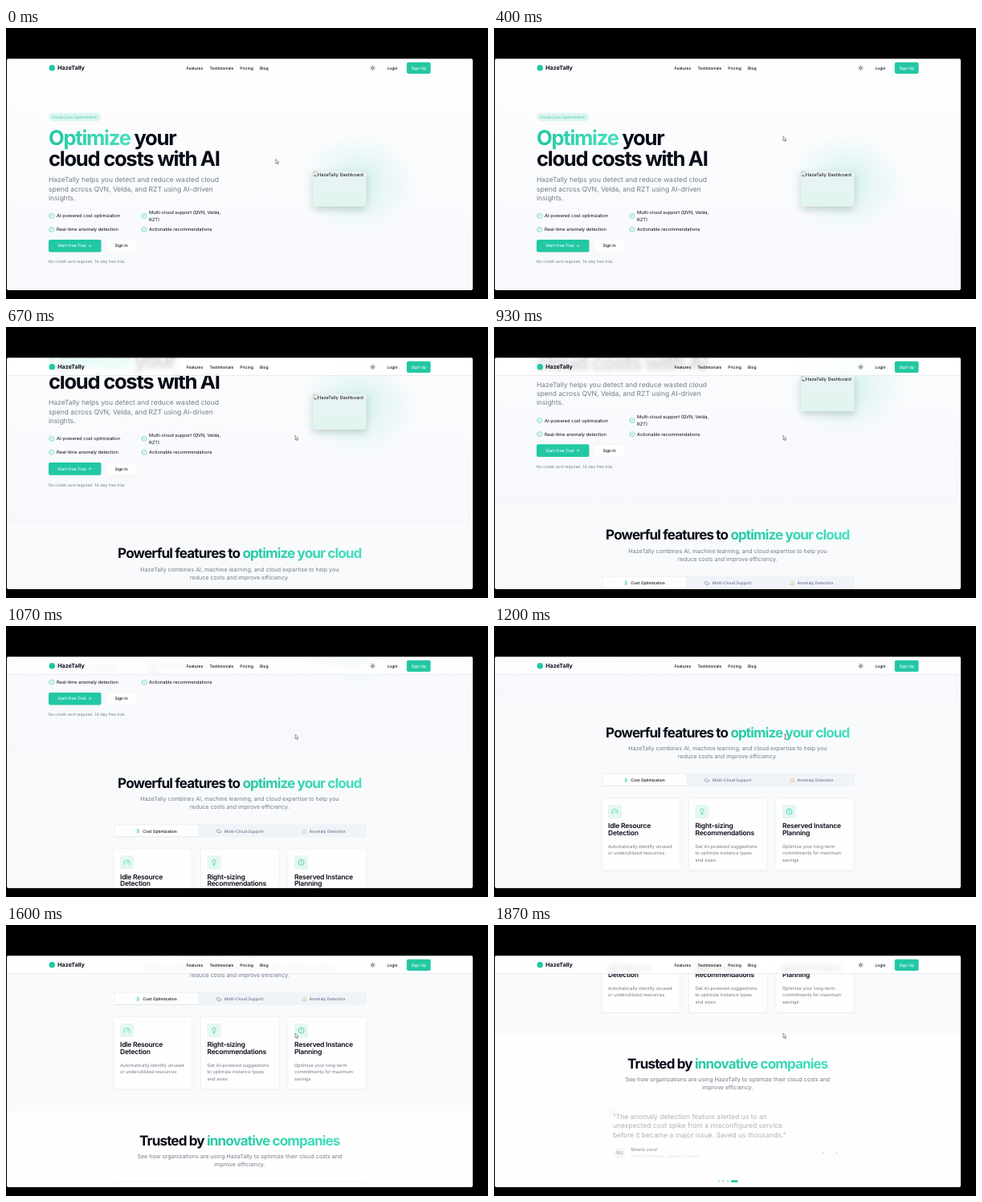
Recreate the animation shown at these times as an HTML page. Size 600x338 px, loop 1.94 s.

```html
<!DOCTYPE html>
<html lang="en">
<head>
<meta charset="utf-8">
<title>Landing page scroll</title>
<style>
html, body { margin: 0; width: 100%; height: 100%; overflow: hidden; background: #000; }
#win { position: absolute; left: 1px; top: 38px; width: 580px; height: 289px; overflow: hidden; border-radius: 3px; background: #fefefe; }
svg { position: absolute; left: -1px; top: -38px; overflow: visible; }
#bar { position: absolute; inset: 0 0 auto; height: 23.3px; box-sizing: border-box; background: #ffffffd4; backdrop-filter: blur(3px); border-bottom: .4px solid #e8ebf0; }
#edge { position: absolute; inset: 0; border-radius: 3px; box-shadow: inset 0 1px #70707499, inset .5px 0 #88888c66; }
text { font-family: Inter, "Open Sans", sans-serif; font-optical-sizing: none; text-rendering: geometricPrecision; white-space: pre; }
</style>
</head>
<body>
<div id="win">
  <svg id="page" width="600" height="800"></svg>
  <div id="bar"></div>
  <svg id="top" width="600" height="338"></svg>
  <div id="edge"></div>
</div>
<script>
const $ = id => document.getElementById(id);
const TEAL = '#22c8a3', INK = '#080b18', GRAY = '#747b88';
const SM = 4.98, BASE = 5.69, LG = 7.11, XL = 8.53;

const text = (x, y, str, size = SM, fill = INK, weight = 400, extra = '') =>
  `<text x="${x}" y="${y}" font-size="${size}" fill="${fill}" font-weight="${weight}" ${extra}>${str}</text>`;
const lines = (x, y, gap, rows, ...style) =>
  rows.map((row, i) => text(x, y + i * gap, row, ...style)).join('');
const rect = (x, y, w, h, fill, r = 2, extra = '') =>
  `<rect x="${x}" y="${y}" width="${w}" height="${h}" rx="${r}" fill="${fill}" ${extra}/>`;
const dot = (x, y, r, fill, extra = '') => `<circle cx="${x}" cy="${y}" r="${r}" fill="${fill}" ${extra}/>`;
// 24-unit line icon centred on x, y
const icon = (x, y, size, color, path, width = 2) =>
  `<path transform="translate(${x} ${y}) scale(${size / 24}) translate(-12 -12)" d="${path}" fill="none" stroke="${color}" stroke-width="${width}" stroke-linecap="round" stroke-linejoin="round"/>`;
const gradient = (id, x1, x2) =>
  `<linearGradient id="${id}" gradientUnits="userSpaceOnUse" x1="${x1}" x2="${x2}"><stop stop-color="#25c7a2"/><stop offset="1" stop-color="#45e2c0"/></linearGradient>`;

const MID = 290.8, center = 'text-anchor="middle"', tight = 'letter-spacing="-.05em"';
const RING = 'M2 12a10 10 0 1 0 20 0a10 10 0 1 0-20 0';
const CHECK = RING + 'M9 12l2 2 4-4';
const CLOCK = RING + 'M12 6v6l4 2';
const GAUGE = 'M12 14l4-4M3.34 19a10 10 0 1 1 17.32 0';
const BULB = 'M15 14c.2-1 .7-1.7 1.5-2.5 1-.9 1.5-2.2 1.5-3.5A6 6 0 0 0 6 8c0 1 .2 2.2 1.5 3.5.7.7 1.3 1.5 1.5 2.5M9 18h6M10 22h4';
const DOLLAR = 'M12 2v20M17 5H9.5a3.5 3.5 0 0 0 0 7h5a3.5 3.5 0 0 1 0 7H6';
const CLOUD = 'M17.5 19H9a7 7 0 1 1 6.71-9h1.79a4.5 4.5 0 1 1 0 9Z';
const ALERT = 'M21.73 18l-8-14a2 2 0 0 0-3.48 0l-8 14A2 2 0 0 0 4 21h16a2 2 0 0 0 1.73-3M12 9v4M12 17h.01';
const ARROW = 'M5 12h14M12 5l7 7-7 7';
const SUN = 'M8 12a4 4 0 1 0 8 0a4 4 0 1 0-8 0M12 2v2M12 20v2M2 12h2M20 12h2M5 5l1.3 1.3M17.7 17.7L19 19M5 19l1.3-1.3M17.7 6.3L19 5';
const QUOTE = 'M3 20c4 0 6-2 6-7V5H2v8h4c0 3-1 4-3 4zM16 20c4 0 6-2 6-7V5h-7v8h4c0 3-1 4-3 4z';

const defs = `<defs>
  ${gradient('g1', 53, 158)}${gradient('g2', 295, 449)}${gradient('g3', 249, 421)}
  <linearGradient id="sky" x2="0" y2="1"><stop stop-color="#fefeff"/><stop offset="1" stop-color="#f6f8fb"/></linearGradient>
  <linearGradient id="shot" x2="0" y2="1"><stop stop-color="#e9f2f4"/><stop offset="1" stop-color="#e1f6ef"/></linearGradient>
  <radialGradient id="glow"><stop stop-color="#22c8a3" stop-opacity=".2"/><stop offset=".5" stop-color="#22c8a3" stop-opacity=".08"/><stop offset="1" stop-color="#22c8a3" stop-opacity="0"/></radialGradient>
  <filter id="soft" x="-40%" y="-40%" width="180%" height="200%"><feDropShadow dx="0" dy="4" stdDeviation="4" flood-color="#20443c" flood-opacity=".22"/></filter>
  <filter id="lift" x="-10%" y="-20%" width="120%" height="150%"><feDropShadow dx="0" dy=".5" stdDeviation=".6" flood-opacity=".12"/></filter>
</defs>`;

const hero = rect(0, 38, 600, 302, 'url(#sky)', 0) +
  rect(53, 106, 65.5, 10.3, '#def5ef', 5.1) +
  text(57, 112.8, 'Cloud Cost Optimization', SM, '#3ccbaa') +
  text(53, 146, '<tspan fill="url(#g1)">Optimize</tspan> your', 25.6, INK, 700, tight) +
  text(53, 171.6, 'cloud costs with AI', 25.6, INK, 700, tight) +
  lines(53, 192.2, 11.38, ['HazeTally helps you detect and reduce wasted cloud',
    'spend across QVN, Velda, and RZT using AI-driven', 'insights.'], XL, GRAY) +
  [[56.7, 234.3], [172, 234.3], [56.7, 251.3], [172, 251.3]].map(p => icon(...p, LG, TEAL, CHECK)).join('') +
  text(63, 236.3, 'AI-powered cost optimization', BASE) +
  lines(178, 232, XL, ['Multi-cloud support (QVN, Velda,', 'RZT)'], BASE) +
  text(63, 253.3, 'Real-time anomaly detection', BASE) +
  text(178, 253.3, 'Actionable recommendations', BASE) +
  rect(53, 264, 65.5, 15.6, TEAL) +
  text(64.5, 273.4, 'Start Free Trial', SM, '#fff', 500) +
  icon(104.3, 271.7, 5.7, '#fff', ARROW) +
  rect(124, 264, 39.7, 15.6, '#fefefe', 2, 'stroke="#e6e9ee" stroke-width=".4"') +
  text(135.5, 273.4, 'Sign In', SM, INK, 500) +
  text(53, 293.4, 'No credit card required. 14-day free trial.', SM, GRAY) +
  '<ellipse cx="438" cy="192" rx="72" ry="62" fill="url(#glow)"/>' +
  rect(382.3, 178.5, 66, 43.8, 'url(#shot)', 2, 'filter="url(#soft)"') +
  '<path d="M383 179.4h3.2l1.6 1.6v4h-4.8z" fill="#fff" stroke="#777" stroke-width=".5"/><path d="M383.3 184.6l1.6-2 2.2 2z" fill="#4a9b54"/>' +
  text(388, 185.1, 'HazeTally Dashboard', BASE);

const card = (x, path, title, body) =>
  rect(x, 459, 97.5, 90.3, '#fefefe', 2.5, 'filter="url(#lift)" stroke="#e6eaef" stroke-width=".4"') +
  rect(x + 8, 467.5, 17, 17, '#e4f7f2') +
  icon(x + 16.5, 476, XL, TEAL, path) +
  lines(x + 8, 496.6, XL, title, XL, INK, 600, 'letter-spacing="-.025em"') +
  lines(x + 8, 521, XL, body, BASE, GRAY);

const features = rect(0, 340, 600, 236.5, '#f8fafc', 0) +
  text(MID, 383.1, 'Powerful features to <tspan fill="url(#g2)">optimize your cloud</tspan>', 17.06, INK, 700, center + tight) +
  lines(MID, 399.5, 9.95, ['HazeTally combines AI, machine learning, and cloud expertise to help you',
    'reduce costs and improve efficiency.'], LG, GRAY, 400, center) +
  rect(134, 428.3, 315, 16.3, '#f0f3f7') +
  rect(135.3, 429.6, 103.7, 13.7, '#fefefe', 1.4, 'filter="url(#lift)"') +
  icon(164.3, 436.8, 6, TEAL, DOLLAR) + text(170.3, 438.7, 'Cost Optimization', SM, INK, 500) +
  icon(265, 436.8, 6.4, '#64748b', CLOUD) + text(272, 438.7, 'Multi-Cloud Support', SM, '#64748b', 500) +
  icon(371, 436.8, 6.4, '#d6b06f', ALERT) + text(377.5, 438.7, 'Anomaly Detection', SM, '#64748b', 500) +
  card(134, GAUGE, ['Idle Resource', 'Detection'], ['Automatically identify unused', 'or underutilized resources']) +
  card(242.5, BULB, ['Right-sizing', 'Recommendations'], ['Get AI-powered suggestions', 'to optimize instance types', 'and sizes']) +
  card(351, CLOCK, ['Reserved Instance', 'Planning'], ['Optimize your long-term', 'commitments for maximum', 'savings']);

const stories = rect(0, 576.5, 600, 300, '#fefefe', 0) +
  text(MID, 619.7, 'Trusted by <tspan fill="url(#g3)">innovative companies</tspan>', 17.06, INK, 700, center + tight) +
  lines(MID, 635.5, 9.95, ['See how organizations are using HazeTally to optimize their cloud costs and',
    'improve efficiency.'], LG, GRAY, 400, center) +
  rect(134, 664.5, 315, 82, '#fefefe', 2.5, 'id="frame" stroke="#e2e6ec" stroke-width=".5"') +
  '<g id="slide">' +
  icon(148, 673, 11, '#b4e8dc', QUOTE, 1.5) +
  lines(148, 682.5, 11.38, ['"The anomaly detection feature alerted us to an',
    'unexpected cost spike from a misconfigured service',
    'before it became a major issue. Saved us thousands."'], XL, '#3b4250') +
  dot(156.5, 724.5, 7, '#e6e9ee') + text(156.5, 726.4, 'MJ', BASE, INK, 400, center) +
  text(170.5, 722.6, 'Meera Joral', BASE, INK, 500) +
  text(170.5, 730.4, 'DevOps Manager, Lumbrel Solutions', SM, '#b4b9c2') +
  '</g>' +
  [[409.6, 'M15 18l-6-6 6-6'], [426.4, 'M9 18l6-6-6-6']].map(([x, d]) =>
    dot(x, 724.5, 5.5, '#fefefe', 'stroke="#f2f4f6" stroke-width=".4"') + icon(x, 724.5, 5, '#71767f', d)).join('') +
  [279.8, 285.5, 291.2].map(x => dot(x, 760, 1.4, '#a5e8d8')).join('') +
  rect(295, 758.6, 8.7, 2.8, TEAL, 1.4);

$('page').innerHTML = defs + hero + features + stories;

$('top').innerHTML = dot(57.3, 49.7, 3.8, TEAL) +
  text(64.3, 52.2, 'HazeTally', LG, INK, 700) +
  [[224.5, 'Features'], [253.5, 'Testimonials'], [291.2, 'Pricing'], [316, 'Blog'], [474.4, 'Login']]
    .map(([x, label]) => text(x, 51.5, label, SM, INK, 500)).join('') +
  icon(456.5, 49.8, 6.6, INK, SUN) +
  rect(498.8, 42.7, 29.8, 14.3, TEAL) + text(504.4, 51.5, 'Sign Up', SM, '#fff', 500) +
  '<path id="arrow" d="M0 0v5.6l1.3-1.1 1 2 .9-.4-.9-2h1.7z" fill="#fff" stroke="#333" stroke-width=".5"/>' +
  '<path id="beam" d="M361.2 135q1.3 0 1.3.8q0-.8 1.3-.8M362.5 135.8v4.6M361.2 141.2q1.3 0 1.3-.8q0 .8 1.3.8" fill="none" stroke="#222" stroke-width=".6"/>';

const LOOP = 1940, STEP = 200 / 3;
const scrollKeys = [[400, 0], [667, 95], [867, 111], [933, 117.5], [1200, 244.5], [1600, 344.5], [1867, 440.5]];
const textBands = [[365, 412], [489, 506], [515, 539]];

const ramp = (t, a, b) => Math.min(1, Math.max(0, (t - a) / (b - a)));
const along = (t, keys) => keys.reduce((v, [time, y], i) =>
  i && t > keys[i - 1][0] ? v + (y - keys[i - 1][1]) * ramp(t, keys[i - 1][0], time) : v, keys[0][1]);

function draw(now) {
  const t = Math.floor((now % LOOP + 5) / STEP) * STEP;
  const scroll = along(t, scrollKeys);
  const move = t < 199 ? 0 : ramp(t, 133, 333);
  const glide = 1 - (1 - move) ** 2;
  const overText = textBands.some(([a, b]) => scroll + 138 > a && scroll + 138 < b);

  $('page').style.transform = `translateY(${-scroll}px)`;
  $('bar').style.visibility = scroll > 0 ? 'visible' : 'hidden';
  $('arrow').setAttribute('transform', `translate(${335.8 + 24.2 * glide} ${163.6 - 28.4 * glide})`);
  $('arrow').style.display = overText ? 'none' : '';
  $('beam').style.display = overText ? '' : 'none';
  $('slide').style.opacity = .4 * ramp(t, 1600, 1867);
  $('frame').style.strokeOpacity = 1 - .9 * ramp(t, 1667, 1867);
  requestAnimationFrame(() => draw(performance.now()));
}
draw(0);
</script>
</body>
</html>
```
